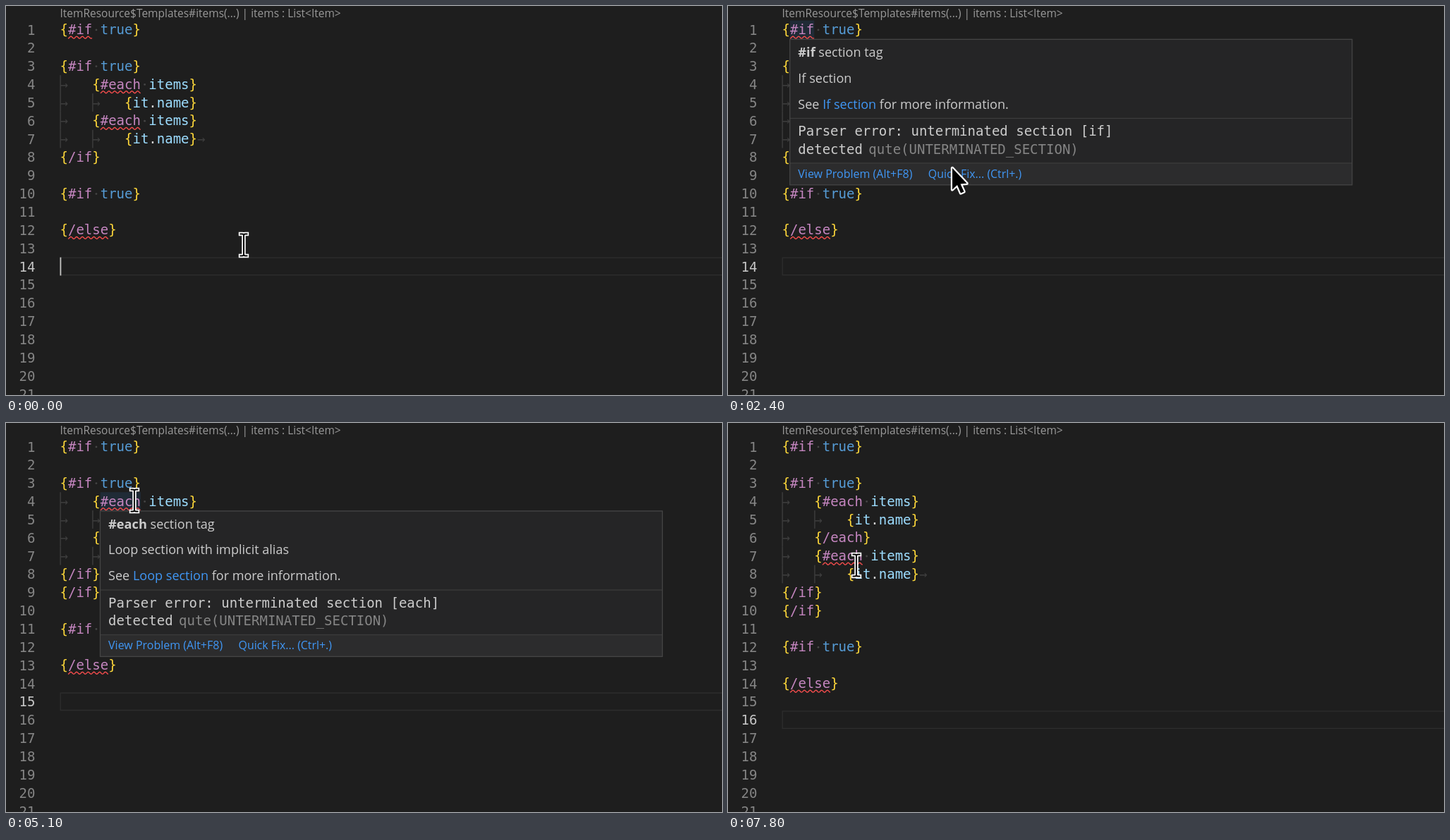
Write an HTML page with a canvas that moves like this. It is 1015 by 552 pixels and loops after 8000 ms.

```html
<!DOCTYPE html>
<html lang="en">
<head>
<meta charset="utf-8">
<title>Editor quick fix</title>
<style>
html, body { margin: 0; width: 100%; height: 100%; overflow: hidden; background: #1e1e1e; }
canvas { display: block; width: 1015px; height: 552px; }
</style>
</head>
<body>
<canvas id="stage"></canvas>
<script>
const W = 1015, H = 552, LOOP = 8000, STEP = 100;
const X0 = 76.5, Y0 = 20.6, CW = 11.44, LH = 25.85, BASE = 19.5;
const MONO = '19px "DejaVu Sans Mono", monospace';
const ui = (size, weight = 400) => `${weight} ${size}px "Open Sans", sans-serif`;
const LINK = '#4097f5', TEXT = '#cccccc';

const canvas = document.getElementById('stage');
const dpr = window.devicePixelRatio || 1;
canvas.width = W * dpr;
canvas.height = H * dpr;
const c = canvas.getContext('2d');
c.scale(dpr, dpr);

// Document states: lines, lines with a problem, active line
const insert = (lines, i, s) => [...lines.slice(0, i), s, ...lines.slice(i)];
const doc1 = ['{#if true}', '', '{#if true}', '\t{#each items}', '\t\t{it.name}',
  '\t{#each items}', '\t\t{it.name}\t', '{/if}', '', '{#if true}', '', '{/else}'];
const doc2 = insert(doc1, 8, '{/if}');
const doc3 = insert(doc2, 5, '\t{/each}');
const states = [
  { at: 0, lines: doc1, errors: [0, 3, 5, 11], active: 13 },
  { at: 3400, lines: doc2, errors: [0, 3, 5, 12], active: 14 },
  { at: 3800, lines: doc2, errors: [3, 5, 12], active: 14 },
  { at: 7200, lines: doc3, errors: [3, 6, 13], active: 15 },
  { at: 7700, lines: doc3, errors: [6, 13], active: 15 }
];

// Times at which the caret turns on and off
const caretOn = [[0, 500], [1000, 1500], [2000, 2400], [3300, 3900], [4400, 4900],
  [5400, 5900], [7100, 7700]];

const hovers = [
  { from: 1000, to: 2500, line: 0, col: 1, tag: '#if', info: 'If section', link: 'If section', name: 'if', fade: [0, 0.2] },
  { from: 4900, to: 6400, line: 3, col: 5, tag: '#each', info: 'Loop section with implicit alias', link: 'Loop section', name: 'each', fade: [0, 0.3] }
];
const menus = [
  { from: 2500, to: 3300, x: 293, y: 291.5 },
  { from: 6400, to: 7100, x: 339, y: 369.5 }
];

// Pointer keys: time, x, y, shape
const path = [
  [0, 337, 339, 'beam'], [200, 200, 117, 'beam'], [300, 200, 117, 'beam'],
  [800, 108, 48, 'beam'], [900, 108, 48, 'beam'], [1000, 108, 43, 'arrow'],
  [1400, 108, 43, 'arrow'], [2200, 317, 228, 'arrow'], [2900, 317, 228, 'arrow'],
  [3000, 394, 342, 'hand'], [3200, 394, 342, 'hand'], [3300, 396, 343, 'beam'],
  [3800, 396, 343, 'beam'], [3900, 396, 340, 'beam'], [4000, 396, 340, 'beam'],
  [4100, 396, 337, 'beam'], [4200, 396, 337, 'beam'], [4500, 188, 96, 'beam'],
  [4600, 188, 96, 'beam'], [4700, 182, 110, 'beam'], [5300, 182, 110, 'beam'],
  [5400, 200, 130, 'arrow'], [6200, 389, 308, 'arrow'], [6500, 389, 308, 'arrow'],
  [6700, 462, 424, 'hand'], [7000, 462, 424, 'hand'], [7100, 463, 426, 'beam'],
  [7300, 463, 426, 'beam'], [7500, 236, 227, 'beam'], [7600, 236, 227, 'beam'],
  [7800, 182, 202, 'beam']
];

const lineTop = i => Y0 + i * LH;
const colX = n => X0 + n * CW;
const during = (t, s) => t >= s.from && t < s.to;

function rect(x, y, w, h, color) {
  c.fillStyle = color;
  c.fillRect(x, y, w, h);
}

function frame(x, y, w, h, color, width = 1.3) {
  c.strokeStyle = color;
  c.lineWidth = width;
  c.strokeRect(x, y, w, h);
}

// Draws text and returns the x where it ends
function text(s, x, y, font, color, align = 'left') {
  c.font = font;
  c.fillStyle = color;
  c.textAlign = align;
  c.fillText(s, x, y);
  return x + c.measureText(s).width;
}

function codeLine(line, i) {
  const top = lineTop(i), y = top + BASE;
  let col = 0;
  for (const tok of line.match(/\t|[{}]|[#\/]\w+|\w+| |\./g) || []) {
    const x = colX(col);
    if (tok === '\t') {
      if (col % 4 === 0) rect(x, top, 1.3, LH, '#404040');
      text('→', x, y, MONO, '#3e3e3e');
      col += 4 - col % 4;
      continue;
    }
    if (tok === ' ') {
      c.fillStyle = '#454545';
      c.beginPath();
      c.arc(x + CW / 2, top + 13.3, 1.4, 0, 7);
      c.fill();
    } else {
      const color = /[{}]/.test(tok) ? '#ffd83a' : /^[#\/]/.test(tok) ? '#c586c0'
        : tok === 'true' ? '#569cd6' : tok === '.' ? '#d4d4d4' : '#9cdcfe';
      text(tok, x, y, MONO, color);
    }
    col += tok.length;
  }
}

function squiggle(line, i) {
  const tag = line.match(/[#\/]\w+/)[0];
  const x = colX(line.startsWith('\t') ? 5 : 1), w = tag.length * CW;
  c.strokeStyle = '#f14c4c';
  c.lineWidth = 1.4;
  c.beginPath();
  for (let d = 0; d <= w; d++) c.lineTo(x + d, lineTop(i) + 24 + 1.5 * Math.cos(d * Math.PI * 2 / 8.15));
  c.stroke();
}

function editor(t) {
  const { lines, errors, active } = states.findLast(s => t >= s.at);
  rect(0, 0, W, H, '#1e1e1e');
  text('ItemResource$Templates#items(...) | items : List<Item>', 76.5, 15.5, ui(15.5), '#999999');
  frame(77.2, lineTop(active) + 0.6, W, LH - 1.4, '#2d2d2d', 1.4);
  for (let i = 0; i < 21; i++)
    text(i + 1, 41.5, lineTop(i) + BASE + 0.4, MONO, i === active ? '#c6c6c6' : '#858585', 'right');
  for (const h of hovers)
    if (during(t, h)) rect(colX(h.col), lineTop(h.line), h.tag.length * CW, LH, '#202b36');
  lines.forEach(codeLine);
  errors.forEach(i => squiggle(lines[i], i));
  if (caretOn.some(([a, b]) => t >= a && t < b)) rect(76.5, lineTop(active), 1.8, LH, '#c4c4c2');
}

function hover(h, t) {
  const age = (t - h.from) / STEP;
  c.save();
  c.globalAlpha = age < h.fade.length ? h.fade[age] : 1;
  c.translate(colX(h.col) - 0.2, lineTop(h.line + 1) + 0.9);
  rect(0, 0, 797, 206.5, '#252526');
  rect(0, 175.5, 797, 31, '#2c2c2d');
  rect(0, 111.5, 797, 1.2, '#3c3c3d');
  rect(0, 175, 797, 1.2, '#3c3c3d');
  frame(0, 0, 797, 206.5, '#454545');
  const body = ui(18.05), x = 11.6;
  let end = text(h.tag, x, 25, ui(18.2, 700), TEXT);
  text(' section tag', end, 25, body, TEXT);
  text(h.info, x, 61.5, body, TEXT);
  end = text('See ', x, 98.3, body, TEXT);
  end = text(h.link, end, 98.3, body, LINK);
  text(' for more information.', end, 98.3, body, TEXT);
  text(`Parser error: unterminated section [${h.name}]`, x, 136.6, MONO, TEXT);
  text('detected', x, 162.5, MONO, TEXT);
  text('qute(UNTERMINATED_SECTION)', x + 100, 162.5, MONO, '#858585');
  text('View Problem (Alt+F8)', x, 196.4, ui(16), LINK);
  text('Quick Fix... (Ctrl+.)', x + 184.5, 196.4, ui(15.9), LINK);
  c.restore();
}

function bulb(x, y) {
  c.fillStyle = '#ffcc33';
  c.beginPath();
  c.arc(x, y - 2.2, 6.6, 0, 7);
  c.fill();
  rect(x - 3.2, y + 2, 6.4, 3.6, '#ffcc33');
  rect(x - 3.2, y + 6.6, 6.4, 2.8, '#ffcc33');
}

function menu(m) {
  const items = [['Insert expected end section', 16.6], ['Exclude this file from validation.', 16.8],
    ['Disable Qute validation for the `qute-quickstart` project.', 17.1]];
  c.save();
  c.translate(m.x, m.y);
  rect(0, 0, 502.5, 135, '#252526');
  frame(0, 0, 502.5, 135, '#454545');
  rect(1, 35.5, 500.8, 32.3, '#0f395c');
  text('Quick Fix...', 14, 25, ui(16.3, 700), LINK);
  items.forEach(([label, size], i) => {
    const y = 52 + i * 32.8;
    bulb(25.5, y);
    text(label, 44, y + 6.3, ui(size), i ? TEXT : '#ffffff');
  });
  c.restore();
}

const shapes = {
  beam: 'M-4.5-15.5H-2Q0-15.5 0-13.5Q0-15.5 2-15.5H4.5M0-13.5V13.5M-4.5 15.5H-2Q0 15.5 0 13.5Q0 15.5 2 15.5H4.5',
  arrow: 'M1 2V32.5L8 26L13 37.5L17.5 35.5L12.5 24.5L21.5 23.8Z',
  hand: 'M-3 2Q-3-1 0-1Q3-1 3 2V11Q6 8.5 9 11Q12 9.5 15 12Q18 10.5 21 13.5Q24 12.5 24 17V21Q24 25 21 28V32H4V29L-4 20Q-6.5 16.5-4.5 15.5Q-3 15-1 18L-3 16Z'
};
for (const k in shapes) shapes[k] = new Path2D(shapes[k]);

function pointer(t) {
  const i = path.findLastIndex(k => t >= k[0]);
  const [ta, xa, ya, kind] = path[i], [tb, xb, yb] = path[i + 1] || path[i];
  const p = tb > ta ? (t - ta) / (tb - ta) : 0;
  const shape = shapes[kind];
  c.save();
  c.translate(xa + (xb - xa) * p, ya + (yb - ya) * p);
  c.lineJoin = 'round';
  c.strokeStyle = '#ffffff';
  if (kind === 'beam') {
    c.lineCap = 'square';
    c.lineWidth = 5.4;
    c.stroke(shape);
    c.strokeStyle = '#000000';
    c.lineWidth = 2;
    c.stroke(shape);
  } else {
    c.fillStyle = '#000000';
    c.lineWidth = 4.4;
    c.stroke(shape);
    c.fill(shape);
  }
  c.restore();
}

function draw() {
  const t = Math.floor(performance.now() % LOOP / STEP) * STEP;
  editor(t);
  for (const h of hovers) if (during(t, h)) hover(h, t);
  for (const m of menus) if (during(t, m)) menu(m);
  pointer(t);
  requestAnimationFrame(draw);
}
draw();
</script>
</body>
</html>
```
